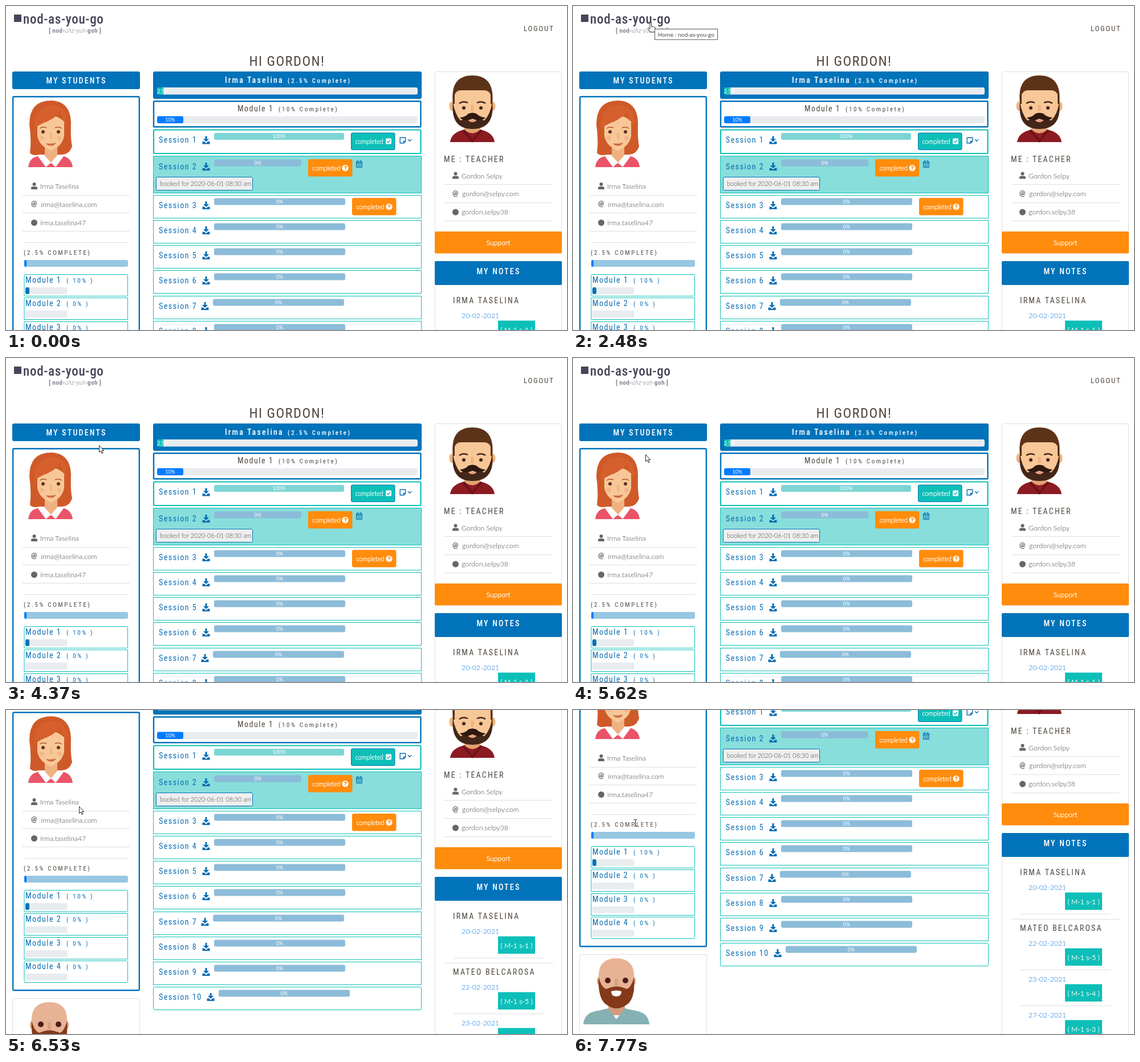
An HTML page that plays this animation: 984 by 569 pixels, repeating every 8000 ms.

```html
<!DOCTYPE html>
<html lang="en">
<head>
<meta charset="utf-8">
<title>Teacher dashboard</title>
<style>
html, body { margin: 0; width: 100%; height: 100%; overflow: hidden; background: #fff; }
svg { display: block; --cut: 0px; }
text { font: 300 12.3px Lato, sans-serif; fill: #444; white-space: pre; }
.h, .sub, .title, .brand, .tag {
  font-family: 'Roboto Condensed', Roboto, sans-serif; font-stretch: 75%; font-weight: 400;
  fill: #504840;
}
.h { font-size: 14px; letter-spacing: calc(2.2px - var(--cut)); }
.row { letter-spacing: calc(1.5px - var(--cut)); }
.nav { font-size: 13px; letter-spacing: calc(1.7px - var(--cut)); }
.sub { font-size: 11px; letter-spacing: calc(2.6px - var(--cut)); }
.title { font-size: 24.5px; letter-spacing: calc(1.4px - var(--cut)); }
.brand { font-size: 23px; font-weight: 500; letter-spacing: calc(.7px - var(--cut)); fill: #4a4458; }
.tag { font-size: 11.5px; fill: #8c889a; letter-spacing: calc(.3px - var(--cut)); }
.tag .b { font-weight: 700; }
.tag .i { font-style: italic; font-weight: 300; }
.mid { text-anchor: middle; }
.blue { fill: #0a6db3; }
.link { fill: #0072dd; }
.white { fill: #fff; }
.strong { font-weight: 500; }
.at { font-weight: 700; fill: #555; }
.btn { font-size: 10.9px; }
.bright { fill: #fff; stroke: #fff; stroke-width: .3px; }
.pct { font-size: 9px; font-weight: 400; fill: #fff; }
.tip { font: 400 9.6px 'Open Sans', sans-serif; fill: #333; }

#page, #arrow, #hand, #tip, #beam { animation: 8s step-end infinite; }
#page { animation-name: scroll; }
#arrow { animation-name: move; }
#hand { animation-name: hand; }
#tip { animation-name: tip; }
#beam { animation-name: beam; }
@keyframes scroll {
  0% { transform: none; }
  77.75% { transform: translateY(-77px); }
  81.625% { transform: translateY(-155px); }
  85.375%, 100% { transform: translateY(-232px); }
}
@keyframes move {
  0% { transform: translate(711px, 519px); opacity: 0; }
  11.625% { transform: translate(711px, 519px); opacity: 1; }
  15.625% { transform: translate(384px, 402px); opacity: 1; }
  19.375% { transform: translate(109px, 105px); opacity: 1; }
  23.375% { transform: translate(109px, 105px); opacity: 0; }
  46.625% { transform: translate(72px, 90px); opacity: 1; }
  50.5% { transform: translate(68px, 129px); opacity: 1; }
  54.625% { transform: translate(163px, 153px); opacity: 1; }
  58.375% { transform: translate(151px, 102px); opacity: 1; }
  62.375% { transform: translate(76px, 110px); opacity: 1; }
  66.25% { transform: translate(94px, 161px); opacity: 1; }
  70.25% { transform: translate(127px, 169px); opacity: 1; }
  81.625% { transform: translate(128px, 169px); opacity: 1; }
  89.375% { transform: translate(127px, 170px); opacity: 1; }
  93.375% { transform: translate(49px, 166px); opacity: 1; }
  97.125%, 100% { transform: translate(49px, 166px); opacity: 0; }
}
@keyframes hand { 0% { opacity: 0; } 23.375% { opacity: 1; } 46.625%, 100% { opacity: 0; } }
@keyframes tip { 0% { opacity: 0; } 31% { opacity: 1; } 46.625%, 100% { opacity: 0; } }
@keyframes beam { 0% { opacity: 0; } 97.125%, 100% { opacity: 1; } }
</style>
</head>
<body>
<svg width="984" height="569" viewBox="0 0 984 569">
  <defs>
    <path id="load" d="M5 0h3v5h3.6L6.5 10 1.4 5H5zM0 9.5h3.4l3.1 3 3.1-3H13V14H0z" fill="#0a6db3"/>
    <g id="user" fill="#666"><circle cx="5.5" cy="3" r="3"/><path d="M0 12V10Q0 7 3 7h5q3 0 3 3v2z"/></g>
    <circle id="chat" cx="5.5" cy="5.5" r="5.5" fill="#666"/>
    <g id="check">
      <rect width="10" height="10" rx="1.5" fill="#fff"/>
      <path d="M2 5l2.2 2.2L8 3" fill="none" stroke="#0dbfb8" stroke-width="1.6"/>
    </g>
    <g id="ask" fill="none" stroke="#ff8c0c" stroke-width="1.5">
      <circle r="5.6" fill="#fff" stroke="none"/>
      <path d="M-1.8-1.3Q-1.6-3 0-3 1.9-3 1.9-1.4 1.9-.3 .6 .2 0 .5 0 1.3M0 2.2v1.5"/>
    </g>
    <g id="cal" fill="none" stroke="#0a6db3">
      <rect x=".6" y="2" width="9.8" height="10.4" rx="1" stroke-width="1.2"/>
      <path d="M3 0v3M8 0v3M1 4.5h9" stroke-width="1.4"/>
      <path d="M2.5 7h6M2.5 9.8h6" stroke-width="1.7" stroke-dasharray="1.6 .6"/>
    </g>
    <path id="note" d="M.7.7h9.6v6.6l-3 3H.7zM7 10V7h3M14.5 3.7l3 3 3-3" fill="none" stroke="#0a6db3" stroke-width="1.4"/>

    <g id="woman">
      <path d="M42 258Q45 238 41 208Q41 166 79 166Q113 167 114 205Q113 234 116 246Q112 260 98 261H58Q47 264 42 258z" fill="#cf5a29"/>
      <path d="M68 240h22v28l-11 9-11-9z" fill="#efb182"/>
      <path d="M55 203V228Q58 246 79 254Q99 246 102 228V203Q80 182 55 203z" fill="#f8c797"/>
      <path d="M50 215Q60 207 72 203Q88 196 96 183Q98 200 107 211Q110 175 79 174Q47 177 50 215z" fill="#d6602d"/>
      <path d="M59 215q6-4 12-1M86 214q6-3 12 1" fill="none" stroke="#b4562c" stroke-width="1.5"/>
      <circle cx="65" cy="221" r="3" fill="#603526"/><circle cx="92" cy="221" r="3" fill="#603526"/>
      <g fill="#f7b58a"><circle cx="63" cy="232" r="4"/><circle cx="94" cy="232" r="4"/></g>
      <path d="M79 222v11" stroke="#efb182" stroke-width="3"/>
      <path d="M70 241q9 2 18-1-3 5.500-9 5.500-6 0-9-4.500z" fill="#cf6a45"/>
      <path d="M39 283Q41 264 62 263L79 277 96 263Q115 265 117 283z" fill="#ea5468"/>
      <path d="M66 261L79 275 70 283 56 264zM91 261L79 275 87 283 101 264z" fill="#fff"/>
    </g>
    <g id="man">
      <g fill="#f0b47f"><ellipse cx="782" cy="176" rx="4.5" ry="8"/><ellipse cx="854" cy="176" rx="4.5" ry="8"/></g>
      <path d="M784 172Q778 122 818 122Q858 122 853 172z" fill="#5b3319"/>
      <path d="M804 204h28v22h-28z" fill="#e0a470"/>
      <path d="M779 239Q781 222 804 217Q818 230 832 217Q855 222 857 239z" fill="#8c1b22"/>
      <path d="M802 218l16 19 16-19" fill="none" stroke="#6d1219" stroke-width="4"/>
      <path d="M787 156Q790 147 800 148H836Q847 147 850 156V190Q848 210 818 212Q789 210 787 190z" fill="#f8c797"/>
      <path d="M784 168Q787 190 797 201Q808 197 818 200Q828 197 839 201Q850 190 853 168Q858 216 818 216Q779 216 784 168z" fill="#43261a"/>
      <path d="M795 171q7-5 15-1M826 170q8-4 15 1" fill="none" stroke="#43261a" stroke-width="2.5"/>
      <circle cx="803" cy="179" r="3" fill="#43261a"/><circle cx="833" cy="179" r="3" fill="#43261a"/>
      <path d="M818 174v11" stroke="#eeb381" stroke-width="5"/>
      <path d="M810 199h16q-2 5-8 5t-8-5z" fill="#e9a183"/>
      <path d="M796 196Q806 195 811 189Q818 186 825 189Q831 195 841 196Q834 204 818 198Q803 204 796 196z" fill="#2e1911"/>
    </g>
    <g id="bald">
      <g fill="#dca581"><ellipse cx="45" cy="708" rx="3" ry="7"/><ellipse cx="107" cy="708" rx="3" ry="7"/></g>
      <path d="M62 740h29v28H62z" fill="#d39c7c"/>
      <path d="M18 784Q20 763 44 760L62 756 76 775 91 756 109 760Q132 763 134 784z" fill="#86b1b4"/>
      <path d="M45 706Q42 668 76 668Q110 668 107 706V725Q102 746 76 750Q50 746 47 725z" fill="#e8b394"/>
      <path d="M45 701Q50 720 59 722Q76 713 94 722Q102 720 107 701Q110 742 92 751Q76 761 61 751Q43 742 45 701z" fill="#84391a"/>
      <circle cx="61" cy="707" r="5" fill="#4b1c18"/><circle cx="92" cy="707" r="5" fill="#4b1c18"/>
      <path d="M76 704v12" stroke="#d9a081" stroke-width="6"/>
      <path d="M67 726q9-3 18 0 0 9-9 9t-9-9z" fill="#fff"/>
    </g>
  </defs>

  <g id="page"></g>

  <path id="arrow" d="M.5.6V12.7L3.2 10.2 5.3 14.7 7.1 13.9 5.1 9.5H8.7z" fill="#fff" stroke="#111" stroke-width=".9"/>
  <path id="hand" d="M135 30.8q0-1.6 1.4-1.6t1.4 1.6v5.4q1.3-.9 2.4.4 1.5-.8 2.2.6 2-.4 2 1.6 0 4-1.4 7H135.400q-1.500-3-3.900-5.500-.6-1.800 1.200-1.900l2.300 1.900z" fill="#fff" stroke="#111" stroke-width=".9"/>
  <g id="tip">
    <rect x="143.5" y="40.5" width="110" height="18.500" fill="#fff" stroke="#555"/>
    <text class="tip" x="149" y="53.500">Home : nod-as-you-go</text>
  </g>
  <path id="beam" d="M106.500 192.500h2.200l.8.800.8-.8h2.200M109.500 193v10.500M106.500 204h2.200l.8-.8.8.8h2.200" fill="none" stroke="#111"/>
</svg>
<script>
const BLUE = '#0073ba', TEAL = '#0dbfb8', ORANGE = '#ff8c0c', TRACK = '#e9ecef',
      BAR = '#8cbcd9', LINE = '#dfdfdf';
const page = document.getElementById('page');
let out = '';

const box = (x, y, w, h, fill, attrs = '') =>
  out += `<rect x="${x}" y="${y}" width="${w}" height="${h}" fill="${fill}" ${attrs}/>`;
const frame = (x, y, w, h, color, width = 1, r = 2, fill = '#fff') =>
  box(x, y, w, h, fill, `rx="${r}" stroke="${color}" stroke-width="${width}"`);
const text = (x, y, str, cls = '') => out += `<text x="${x}" y="${y}" class="${cls}">${str}</text>`;
const icon = (id, x = 0, y = 0) => out += `<use href="#${id}" x="${x}" y="${y}"/>`;
const rule = (x1, x2, y) => box(x1, y, x2 - x1, 1, LINE);
const bar = (x, y, w, fill, h = 12.5) => box(x, y, w, h, fill, 'rx="3"');

function contacts(x, y, x1, x2, [name, mail, chat]) {
  icon('user', x, y - 11);
  text(x + 16, y, name);
  text(x, y + 31, '@', 'at');
  text(x + 17, y + 31.500, mail);
  icon('chat', x, y + 54);
  text(x + 16, y + 63.500, chat);
  for (let i = 0; i < 3; i++) rule(x1, x2, Math.floor(y + 11 + i * 31.8));
}

function button(x, y, done) {
  frame(x + .5, y + .5, 76.500, 29.500, done ? BLUE : ORANGE, 1, 2, done ? TEAL : ORANGE);
  text(x + 7.500, y + 19.500, 'completed', 'btn bright');
  done ? icon('check', x + 61, y + 10) : icon('ask', x + 65, y + 15.500);
}

function header() {
  box(14, 15, 13, 13, '#4a4458');
  text(30, 31, 'nod-as-you-go', 'brand');
  text(75, 46.500, '<tspan class="b">[ nod-</tspan><tspan class="i">uhz-yuh-</tspan><tspan class="b">goh ]</tspan>', 'tag');
  text(908, 43.500, 'LOGOUT', 'h nav');
  text(493, 104.500, 'HI GORDON!', 'title mid');
}

function students() {
  box(11, 115, 224, 31, BLUE, 'rx="3"');
  text(123.500, 136, 'MY STUDENTS', 'h white strong mid');
  frame(12.200, 159.200, 221.600, 488, BLUE, 2.400);
  icon('woman');
  contacts(44, 321, 29, 217, ['Irma Taselina', 'irma@taselina.com', 'irma.taselina47']);
  rule(32, 214, 415);
  text(31, 437, '(2.5% COMPLETE)', 'sub');
  bar(32, 446, 182, '#98c7e2', 12);
  bar(32, 446, 4, '#007bff', 12);
  for (let i = 0; i < 4; i++) {
    const y = Math.round(470.6 + i * 41.600);
    frame(32, y + .5, 181.500, 38, TEAL, 1, i % 3 ? 0 : 2);
    text(34, y + 14.500, `Module ${i + 1}`, 'h row blue');
    text(106, y + 14.500, `( ${i ? 0 : 10}% )`, 'sub blue');
    bar(34, y + 23, 73.500, TRACK, 12);
    if (!i) bar(34, y + 23, 7, BLUE, 12);
  }
  frame(11.500, 661.500, 223, 200, LINE);
  icon('bald');
}

function session(n, y, { x = 365, w = 230, pct = 0, color = BAR } = {}) {
  text(268, y + 22.500, `Session ${n}`, 'h row blue');
  icon('load', x - 20.500, y + 11);
  bar(x, y + 5.500, w, color, 12);
  text(x + w / 2, y + 14.800, `${pct}%`, 'pct mid');
}

function course() {
  frame(258.500, 115.500, 470, 47, '#0069ad', 1, 2, BLUE);
  text(384, 134.500, 'Irma Taselina', 'h white strong');
  text(494, 134.500, '(2.5% Complete)', 'sub white strong');
  bar(265, 143, 457, TRACK);
  bar(265, 143, 11.500, TEAL);
  text(265, 152.600, '2.5%', 'pct');

  frame(259, 167.200, 468.500, 45, BLUE, 2.400, 1);
  text(406, 185, 'Module 1', 'h row');
  text(478, 185, '(10% Complete)', 'sub');
  bar(265, 193.500, 457, TRACK);
  bar(265, 193.500, 46, '#007bff');
  text(288, 203, '10%', 'pct mid');

  frame(259, 217.500, 468.500, 41.500, TEAL, 2.200, 1);
  session(1, 217.500, { w: 228, pct: 100, color: '#7dd6d4' });
  button(605, 222.500, true);
  icon('note', 690.500, 230.500);

  frame(258.500, 263.500, 470, 65, TEAL, 1, 0, '#87dedb');
  session(2, 264, { w: 153 });
  button(530, 269, false);
  icon('cal', 614, 271);
  frame(263.500, 300.500, 169, 23, BLUE, 1, 2, '#efefef');
  text(270, 316, 'booked for 2020-06-01 08:30 am', 'btn');

  for (let n = 3; n <= 10; n++) {
    const y = Math.round(332 + (n - 3) * 44.150);
    frame(258.500, y + .5, 470, 40, TEAL, 1, n === 10 ? 2 : 0);
    session(n, y, { x: n === 7 ? 363 : n === 10 ? 373 : 365 });
  }
  button(607, 337, false);
}

function lesson(y, date, code) {
  text(799, y, date, 'link');
  box(863, y + 4.500, 65, 30.500, TEAL);
  text(895.500, y + 24.500, `( M-1 s-${code} )`, 'bright mid');
  rule(785, 943, y + 42);
}

function teacher() {
  frame(752.500, 115.500, 222, 318, LINE);
  icon('man');
  text(768, 273.500, 'ME : TEACHER', 'h');
  contacts(783, 302.500, 768, 959, ['Gordon Selpy', 'gordon@selpy.com', 'gordon.selpy38']);
  box(752, 396, 223, 38.500, ORANGE, 'rx="2"');
  text(863.500, 420, 'Support', 'bright mid');

  frame(752.500, 448.500, 222, 420, LINE);
  box(752, 448, 223, 42, BLUE, 'rx="2"');
  text(864, 471, 'MY NOTES', 'h white strong mid');
  text(784, 522, 'IRMA TASELINA', 'h');
  lesson(548, '20-02-2021', 1);
  rule(768, 960, 599);
  text(784, 620, 'MATEO BELCAROSA', 'h');
  lesson(646, '22-02-2021', 5);
  lesson(709, '23-02-2021', 4);
  lesson(772, '27-02-2021', 3);
}

[header, students, course, teacher].forEach(draw => draw());
page.innerHTML = out;

// Tighten the tracking when no condensed face is available.
const label = page.querySelector('.h.mid');
if (label.getComputedTextLength() > 113) page.ownerSVGElement.style.setProperty('--cut', '.07em');
</script>
</body>
</html>
```
